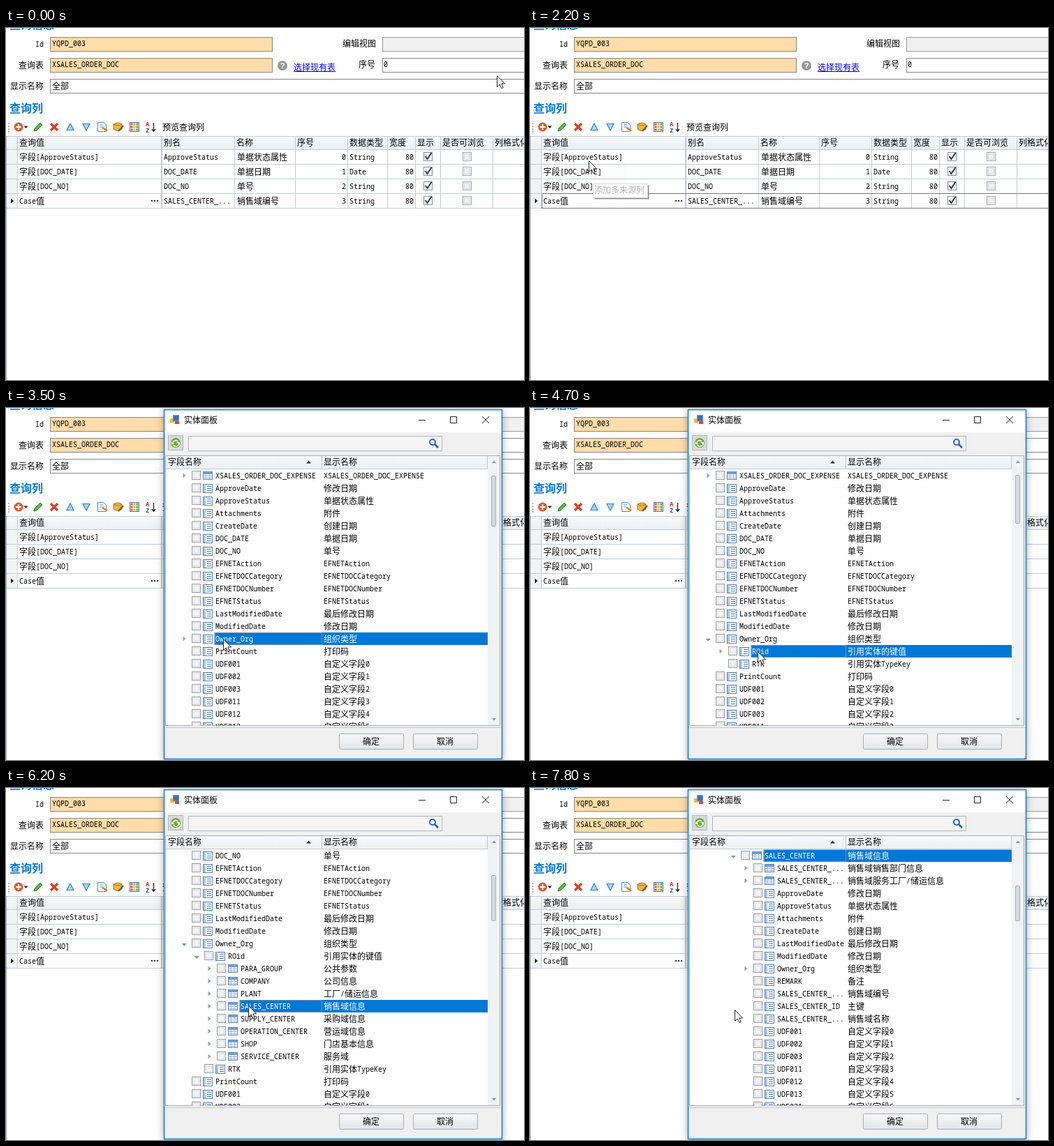
These frames come from a looping animation (742x505 px, 8 s). An HTML page:

```html
<!DOCTYPE html>
<html lang="zh-CN">
<head>
<meta charset="utf-8">
<style>
html, body { margin: 0; width: 100%; height: 100%; overflow: hidden; background: #fff; }
svg { display: block; width: 742px; height: 505px; }
text { white-space: pre; }
.c { font-family: "Noto Sans CJK SC", "Noto Sans CJK JP", "Noto Sans CJK", sans-serif; }
.m { font-family: "Noto Sans Mono", "Liberation Mono", monospace; font-size: 10px; }
</style>
</head>
<body>
<svg id="stage" viewBox="0 0 742 505" xmlns="http://www.w3.org/2000/svg">
  <defs>
    <clipPath id="listClip"><rect x="229" y="88.5" width="461" height="367"/></clipPath>
    <linearGradient id="btn" x2="0" y2="1"><stop stop-color="#f8f8f9"/><stop offset="1" stop-color="#e4e5e8"/></linearGradient>
    <linearGradient id="head" x2="0" y2="1"><stop stop-color="#f7f8fa"/><stop offset="1" stop-color="#eceef1"/></linearGradient>
  </defs>
  <g id="page"></g>
  <g id="focus"></g>
  <g id="menu"></g>
  <g id="dialog"><g id="frame"></g><g id="list" clip-path="url(#listClip)"></g><g id="thumb"></g></g>
  <path id="cursor" d="M.5 .5V16.5L4.2 13L6.8 18.6L9.2 17.5L6.7 12H11.6Z" fill="#fff" stroke="#222"/>
</svg>
<script>
const $ = id => document.getElementById(id);
const BLUE = '#0078d7';

// ---- drawing helpers: all return SVG markup ----
const box = (x, y, w, h, fill = 'none', stroke = 'none', more = '') =>
  `<rect x="${x}" y="${y}" width="${w}" height="${h}" fill="${fill}" stroke="${stroke}" ${more}/>`;
const frame = (x, y, w, h, fill, stroke, more) => box(x + .5, y + .5, w - 1, h - 1, fill, stroke, more);
const path = (d, fill = 'none', stroke = 'none', w = 1) =>
  `<path d="${d}" fill="${fill}" stroke="${stroke}" stroke-width="${w}"/>`;
const disc = (x, y, r, fill, stroke = 'none', w = 1) =>
  `<circle cx="${x}" cy="${y}" r="${r}" fill="${fill}" stroke="${stroke}" stroke-width="${w}"/>`;
const at = (x, y, s) => `<g transform="translate(${x} ${y})">${s}</g>`;

const isHan = s => /[\u3000-\u9fff]/.test(s);
const width = s => [...s].reduce((w, ch) => w + (isHan(ch) ? 12 : 6), 0);

// text centred on y; full-width characters take 12px and half-width ones 6px
function txt(x, y, s, fill = '#000', right = false) {
  if (right) x -= width(s);
  return s.match(/[\u3000-\u9fff]+|[^\u3000-\u9fff]+/g).map(run => {
    const han = isHan(run);
    const out = `<text class="${han ? 'c' : 'm'}" ${han ? 'font-size="12"' : ''} x="${x}" y="${y + (han ? 4.5 : 4)}" fill="${fill}">${run}</text>`;
    x += width(run);
    return out;
  }).join('');
}
const title = (x, y, s) =>
  `<text class="c" font-size="16" font-weight="700" x="${x}" y="${y + 6}" fill="#0a78d8">${s}</text>`;

// ---- main page ----
function toolbar() {
  const tri = up => path(up ? 'M0 -5L5 4.5H-5Z' : 'M0 5L5 -4.5H-5Z', '#a9d8f8', '#2f7fc4', 1.2);
  const colors = ['#e8503a', '#f2b632', '#5aa83c', '#4a86d8'];
  let cells = frame(-7, -7, 14, 14, '#fff', '#4a78b8');
  for (let i = 0; i < 9; i++)
    cells += box(-5.5 + i % 3 * 4, -5.5 + Math.floor(i / 3) * 4, 3, 3, colors[(i + Math.floor(i / 3)) % 4]);
  const pen = path('M-6 6L-5 2L3 -6L6 -3L-2 5Z', '#5cb548', '#2f7d2c');
  const icons = [
    [18, disc(0, 0, 6.5, '#e2582c') + path('M-4 0H4M0 -4V4', 'none', '#fff', 2.2)],
    [46, pen],
    [69, path('M-5 -5L5 5M5 -5L-5 5', 'none', '#d8402f', 3.4)],
    [92, tri(true)],
    [115, tri(false)],
    [138, path('M-6.5 -6.5H2L5.5 -3V6.5H-6.5Z', '#fff', '#4a86c8') + path('M-4 -3H1M-4 0H2', 'none', '#5a94d8') + path('M0 1L7 5', 'none', '#e08a2a', 2.6)],
    [161, path('M-7 -4Q-1 -8 5 -4V3Q-1 8 -7 3Z', '#f0b840', '#a8721c') + path('M-7 -4Q-1 0 5 -4', 'none', '#a8721c') + path('M0 6L7 -2', 'none', '#7a5a28', 2.4)],
    [184, cells],
    [207, `<text class="m" font-weight="700" x="-7" y="-1" fill="#d02820" style="font-size:9px">A</text>` +
      `<text class="m" font-weight="700" x="-7" y="8" fill="#2848c0" style="font-size:9px">Z</text>` +
      path('M4.5 -6V5M2 3L4.5 6.5L7 3', 'none', '#222', 1.3)]
  ];
  let s = '';
  for (let y = 136; y < 150; y += 4) s += box(3, y, 2, 2, '#b0b4ba');
  return s + icons.map(([x, icon]) => at(x, 142, icon)).join('') +
    path('M25.5 140.5H31.5L28.5 144Z', '#222') + txt(224, 142, '预览查询列');
}

function table() {
  const lines = [16, 222, 327, 414, 489, 546, 586, 622, 697];
  const heads = ['查询值', '别名', '名称', '序号', '数据类型', '宽度', '显示', '是否可浏览', '列格式化'];
  const rows = [
    ['字段[ApproveStatus]', 'ApproveStatus', '单据状态属性', 'String'],
    ['字段[DOC_DATE]', 'DOC_DATE', '单据日期', 'Date'],
    ['字段[DOC_NO]', 'DOC_NO', '单号', 'String'],
    ['Case值', 'SALES_CENTER_...', '销售域编号', 'String']
  ];
  let s = box(0, 155, 742, 20, 'url(#head)') + box(0, 175, 16, 83, '#f2f3f5');
  s += [155, 174, 195, 216, 237, 258].map(y => box(0, y, 742, 1, '#c3cad4')).join('');
  s += lines.map(x => box(x, 155, x === 222 ? 2 : 1, 104, '#c3cad4')).join('') + box(0, 155, 1, 350, '#a4aab4');
  s += heads.map((h, i) => txt(lines[i] + (i === 1 ? 4 : 3), 164, h)).join('');
  rows.forEach(([value, alias, name, type], i) => {
    const y = 185 + i * 21;
    s += txt(19, y, value) + txt(226, y, alias) + txt(331, y, name) + txt(487, y, String(i), '#000', true) +
      txt(492, y, type) + txt(584, y, '80', '#000', true) +
      frame(598, y - 7, 13, 13, '#f6f6f6', '#8a8f96') + path(`M600.5 ${y - 1}L603.5 ${y + 3}L609.5 ${y - 6}`, 'none', '#333c48', 2) +
      frame(654, y - 7, 13, 13, '#f4f4f4', '#a4a8ae') + frame(656, y - 5, 9, 9, '#f0f0f0', '#d4d6da');
  });
  return s + path('M7 244.5L11 248L7 251.5Z', '#222') +
    [208, 212, 216].map(x => box(x, 247, 2, 2, '#222')).join('');
}

$('page').innerHTML =
  title(5, -5, '查询信息') +
  txt(54, 23, 'Id', '#000', true) + txt(54, 53, '查询表', '#000', true) + txt(54, 83, '显示名称', '#000', true) +
  frame(63, 13, 319, 21, '#ffdcaa', '#858585') + txt(66, 22, 'YQPD_003') +
  frame(63, 43, 319, 21, '#ffdcaa', '#858585') + txt(66, 52, 'XSALES_ORDER_DOC') +
  frame(63, 73, 690, 21, '#fff', '#858585') + txt(66, 83, '全部') +
  txt(530, 22, '编辑视图', '#000', true) + frame(539, 13, 220, 21, '#f0f0f0', '#9a9a9a') +
  txt(529, 52, '序号', '#000', true) + frame(539, 43, 220, 21, '#fff', '#858585') + txt(541, 52, '0') +
  disc(396, 54, 7, '#989898') + `<text x="396" y="58" text-anchor="middle" font-family="Liberation Sans, sans-serif" font-weight="700" font-size="11" fill="#fff">?</text>` +
  txt(412, 56, '选择现有表', '#00f') + box(412, 62, 60, 1, '#00f') +
  title(5, 115, '查询列') + toolbar() + table();

$('focus').innerHTML =
  `<path d="M17 237.5H742M17 258.5H742M17.5 237V258" stroke="#222" stroke-dasharray="1 1"/>`;

// ---- drop-down menu ----
function menu(t) {
  let s = '';
  if (t >= 800 && t < 2200) s += frame(9, 131, 25, 22, '#0078d722', '#9cc4e8');
  if (t >= 1200 && t < 2200) {
    const hover = t >= 1900 ? 1 : t >= 1800 ? 0 : -1;
    s += box(12, 156, 128, 69, '#0002') + frame(9, 153, 129, 69, '#f6f6f7', '#b4b8be');
    ['添加单个列', '添加多来源列', '添加空白列'].forEach((item, i) => {
      const y = 155 + i * 22;
      if (i === hover) s += frame(11, y, 121, 21, '#cfe5f8', '#8fc0ea');
      s += txt(40, y + 11, item);
    });
    return `<g opacity="${t < 1300 ? .6 : 1}">${s}</g>`;
  }
  if (t === 2200)
    s += box(84, 196, 55, 27, '#8881', 'none', 'opacity=".5"') +
      box(92, 225, 79, 21, '#0003') + box(168, 226, 2, 19, '#888') + box(93, 243, 77, 2, '#888') +
      frame(90, 223, 79, 21, '#fcfcfc', '#ddd') + txt(92, 232, '添加多来源列', '#b8b8b8');
  return s;
}

// ---- dialog ----
const button = (x, s, stroke = '#a8acb2') => frame(x, 467, 93, 23, 'url(#btn)', stroke, 'rx="2"') + txt(x + 34, 478, s);

$('frame').innerHTML =
  box(226, 2, 485, 502, '#f0f0f0', 'none', 'style="filter:drop-shadow(0 2px 6px #0005)"') +
  box(226, 2, 485, 33, '#fff') + frame(226, 2, 485, 502, 'none', '#1a80d4', 'stroke-width="1.6"') +
  at(235, 10, box(0, 5, 6, 6, '#f2b632') + box(5, 1, 7, 7, '#3a70c8') + box(7, 8, 6, 5, '#d8483a') + frame(4, 0, 9, 9, 'none', '#7a8898')) +
  txt(255, 17, '实体面板') +
  path('M591 17.5H601M636.5 12.5H645.5V21.5H636.5ZM682 12L692 22M692 12L682 22', 'none', '#222') +
  frame(232, 39, 22, 22, '#d9dadc', '#b4b6ba') + disc(243, 50, 7, '#6fae34') +
  path('M239 51A4 4 0 0 1 246 48M247 49A4 4 0 0 1 240 53', 'none', '#fff', 1.6) + path('M244 49H249V53ZM241 52H237V48Z', '#fff') +
  frame(261, 40, 364, 22, '#f5f5f6', '#b0b4ba') +
  disc(611, 49, 4, 'none', '#2a62c0', 2) + path('M614 52L619 57', 'none', '#2a62c0', 2.6) +
  frame(228, 68, 480, 388, '#fff', '#a8adb5') + box(229, 69, 461, 19, 'url(#head)') + box(229, 87, 461, 1, '#c6cbd3') +
  box(452, 69, 1, 18, '#c0c5cd') + box(689, 69, 1, 18, '#c0c5cd') +
  txt(232, 77, '字段名称') + path('M430 79.5H437L433.5 75.5Z', '#333') + txt(455, 77, '显示名称') +
  box(690, 69, 17, 386, '#f1f2f4') + path('M696 79H702L699 75.5ZM696 445H702L699 448.5Z', '#8a9098') +
  box(227, 458, 483, 1, '#c4c6ca') +
  button(477, '确定') + button(583, '取消') + '<g id="okFocus">' + frame(478, 468, 91, 21, 'none', '#4a7fc8', 'stroke-width="1.5"') + '</g>';

// ---- tree ----
// entry: name:label:kind, where t is a table node and e a field with children
const parse = (depth, s) => s.trim().split(/\s+/).map(e => {
  const [name, label, kind] = e.split(':');
  return { depth, name, label: label || name, kind };
});
const udf = ['001', '002', '003', '011', '012', '013', '021', '022', '023'].map((n, i) => `UDF${n}:自定义字段${i}`).join(' ');
const chain = ['XSALES_ORDER_DOC', 'Owner_Org', 'ROid', 'SALES_CENTER'];
const inChain = row => chain[row.depth] === row.name;
const children = [
  parse(1, `XSALES_ORDER_DOC_D::t XSALES_ORDER_DOC_INSTAL::t XSALES_ORDER_DOC_EXPENSE::t
    ApproveDate:修改日期 ApproveStatus:单据状态属性 Attachments:附件 CreateDate:创建日期
    DOC_DATE:单据日期 DOC_NO:单号 EFNETAction EFNETDOCCategory EFNETDOCNumber EFNETStatus
    LastModifiedDate:最后修改日期 ModifiedDate:修改日期 Owner_Org:组织类型:e PrintCount:打印码 ${udf}`),
  parse(2, 'ROid:引用实体的键值:e RTK:引用实体TypeKey'),
  parse(3, `PARA_GROUP:公共参数:t COMPANY:公司信息:t PLANT:工厂/储运信息:t SALES_CENTER:销售域信息:t
    SUPPLY_CENTER:采购域信息:t OPERATION_CENTER:营运域信息:t SHOP:门店基本信息:t SERVICE_CENTER:服务域:t`),
  parse(4, `SALES_CENTER_...:销售域销售部门信息:t SALES_CENTER_...:销售域服务工厂/储运信息:t
    ApproveDate:修改日期 ApproveStatus:单据状态属性 Attachments:附件 CreateDate:创建日期
    LastModifiedDate:最后修改日期 ModifiedDate:修改日期 Owner_Org:组织类型:e REMARK:备注
    SALES_CENTER_...:销售域编号 SALES_CENTER_ID:主键 SALES_CENTER_...:销售域名称 ${udf}`)
];
const expand = (row, open) => inChain(row) && row.depth <= open
  ? [row, ...children[row.depth].flatMap(r => expand(r, open))] : [row];

const tableIcon = frame(-7, -6, 14, 12, '#fff', '#5a86c0') + box(-6, -5, 12, 3, '#6f9fe0') +
  path('M-6 .5H6M-6 3.5H6M-2.5 -2V5M2.5 -2V5', 'none', '#9db8dc');
const fieldIcon = frame(-7, -6, 14, 13, '#fff', '#5a80b4') + box(-6, -5, 3, 11, '#a8c6ee') +
  path('M-1 -2.5H5M-1 .5H5M-1 3.5H5', 'none', '#4a74b0') + box(-6, -5, 12, 1, '#d4e4f8');

function drawRow(row, y, open, sel) {
  const dx = row.depth * 18, chosen = inChain(row) && row.depth === sel;
  let s = '';
  if (row.kind)
    s += inChain(row) && row.depth <= open
      ? path(`M${233.5 + dx} ${y}H${241 + dx}L${237.2 + dx} ${y + 3.8}Z`, '#8a8f96')
      : path(`M${235.5 + dx} ${y - 3.5}V${y + 3.5}L${239.5 + dx} ${y}Z`, '#9a9fa6');
  s += frame(248 + dx, y - 7, 13, 13, '#f5f5f5', '#9499a0') + frame(250 + dx, y - 5, 9, 9, '#f3f3f3', '#dcdee2') +
    at(271 + dx, y, row.kind === 't' ? tableIcon : fieldIcon);
  if (chosen)
    s += box(280.5 + dx, y - 9, 409.5 - dx, 18, BLUE) +
      frame(281 + dx, y - 9, 172 - dx, 18, 'none', '#e8a860', 'stroke-dasharray="1 1"');
  const ink = chosen ? '#fff' : '#000';
  return s + txt(282 + dx, y, row.name, ink) + txt(455, y, row.label, ink);
}

// time, first row, open depth, selected depth, thumb top, thumb height
const states = [
  [0, 0, 0, -1, 86, 73], [2900, 3, 0, -1, 97, 73], [3500, 3, 0, 1, 97, 73],
  [4100, 3, 1, 1, 96, 70], [4700, 3, 1, 2, 96, 70], [5200, 3, 2, 2, 95, 66],
  [5500, 6, 2, 2, 115, 66], [5700, 9, 2, 2, 125, 66], [6200, 9, 2, 3, 125, 66],
  [7000, 9, 3, 3, 109, 51], [7400, 15, 3, 3, 125, 51], [7700, 18, 3, 3, 132, 51], [7800, 21, 3, 3, 140, 51]
];
let shown;
function tree(t) {
  const state = states.filter(s => s[0] <= t).pop();
  if (state === shown) return;
  shown = state;
  const [, first, open, sel, top, height] = state;
  $('list').innerHTML = expand({ depth: 0, name: chain[0], label: '销售订单', kind: 't' }, open)
    .slice(first, first + 21).map((row, i) => drawRow(row, 97 + i * 18, open, sel)).join('');
  $('thumb').innerHTML = frame(695, top, 7, height, '#d8dade', '#a9aeb6', 'rx="1.5"');
}

// ---- pointer: time, x, y ----
const track = [
  [0, 703, 68], [200, 640, 45], [500, 300, 90], [800, 16, 141], [1600, 16, 141], [1800, 44, 164],
  [2000, 84, 190], [2200, 84, 190], [2400, 98, 194], [2700, 200, 310], [3000, 318, 468], [3200, 322, 410],
  [3400, 311, 331], [3600, 311, 331], [3900, 257, 331], [4300, 258, 331], [4600, 326, 349], [4800, 326, 349],
  [5100, 274, 349], [5600, 274, 349], [6100, 347, 312], [6300, 347, 312], [6400, 308, 312], [6600, 308, 312],
  [6800, 294, 313], [7200, 294, 313], [7400, 293, 318], [8000, 293, 318]
];
function pointer(t) {
  const i = track.findIndex(k => k[0] > t), a = track[i - 1], b = track[i];
  const p = (t - a[0]) / (b[0] - a[0]);
  return [1, 2].map(j => Math.round(a[j] + (b[j] - a[j]) * p));
}

function draw(t) {
  $('focus').style.display = t >= 1300 && t < 2300 ? '' : 'none';
  $('menu').innerHTML = menu(t);
  const [scale, alpha] = t < 2300 ? [1, 0] : t < 2400 ? [.95, .45] : t < 2500 ? [.9915, .88] : [1, 1];
  const d = $('dialog');
  d.style.display = alpha ? '' : 'none';
  d.setAttribute('opacity', alpha);
  d.setAttribute('transform', `translate(468 253) scale(${scale}) translate(-468 -253)`);
  $('okFocus').style.display = t < 2900 ? '' : 'none';
  tree(t);
  $('cursor').setAttribute('transform', `translate(${pointer(t)})`);
}

const start = performance.now();
let last = -1;
function tick() {
  const t = Math.floor((performance.now() - start) % 8000 / 100) * 100;
  if (t !== last) draw(last = t);
  requestAnimationFrame(tick);
}
tick();
</script>
</body>
</html>
```
